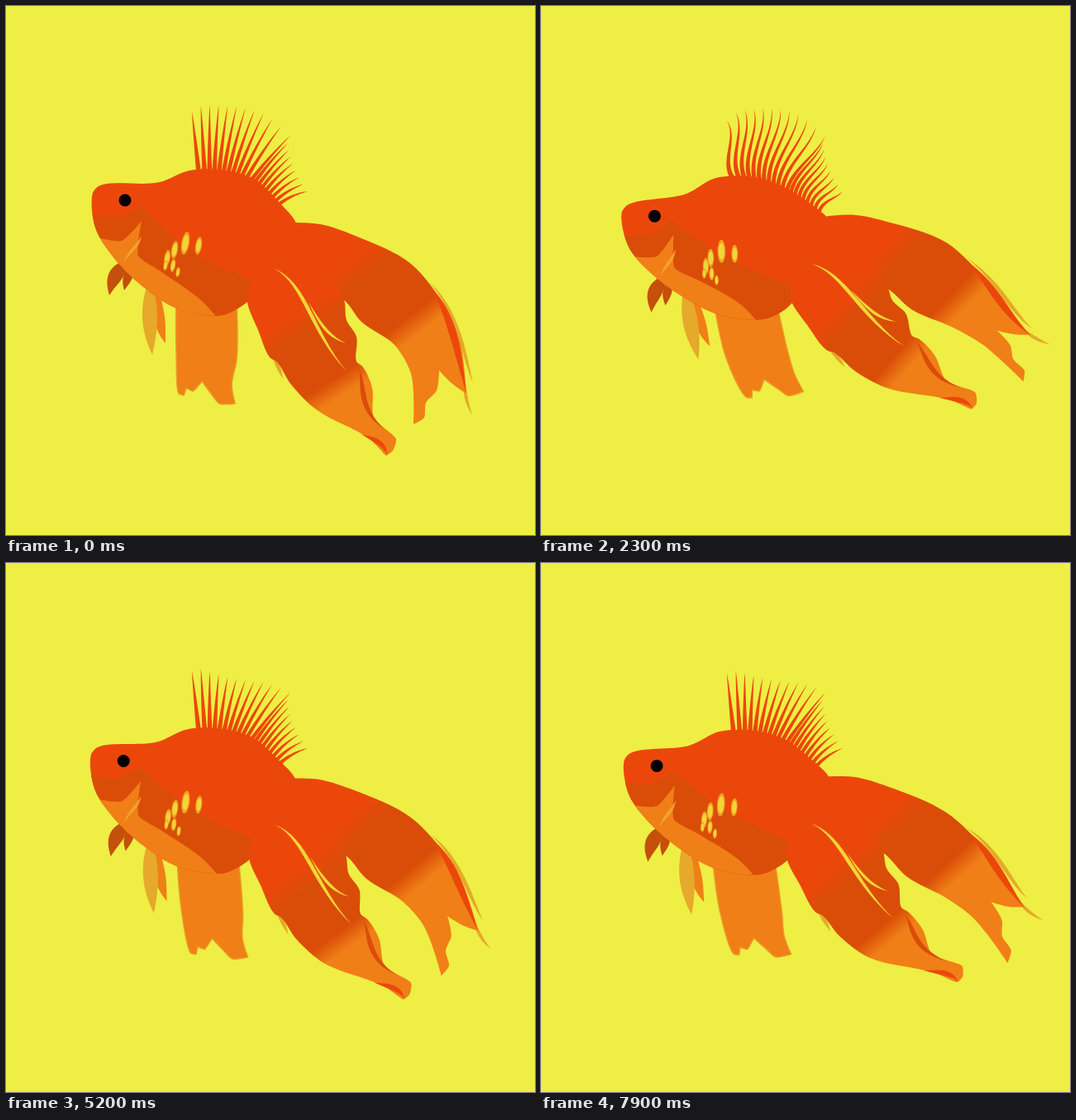
Recreate the animation shown at these times as an HTML page with a canvas. Size 640x640 px, loop 8 s.

```html
<!DOCTYPE html>
<html lang="en">
<head>
<meta charset="utf-8">
<title>Goldfish</title>
<style>
html, body { margin: 0; width: 100%; height: 100%; overflow: hidden; background: #eeee44; }
canvas { display: block; width: 100vw; height: 100vh; }
</style>
</head>
<body>
<canvas id="stage" width="640" height="640"></canvas>
<script>
const ctx = document.getElementById('stage').getContext('2d');
const LOOP = 8000, STEP = 100, PERIOD = 6250;
const RED = '#ec470b', DARK = '#da4d08', ORANGE = '#f07f17',
  RUST = '#c4500b', AMBER = '#e6a92a', YELLOW = '#f2d636';

const clamp = v => Math.max(0, Math.min(1, v));
const ease = v => v * v * (3 - 2 * v);

// swing: raw stroke, lift: eased stroke, flare: tail tips opening,
// wave: ripple in the dorsal rays, trim: shortening of those rays
let swing, lift, flare, wave, trim;

function setPose(t) {
  const phase = (t - 100) / PERIOD * 2 * Math.PI;
  swing = (1 - Math.cos(phase)) / 2;
  lift = ease(swing);
  flare = (1 - lift) * clamp(t / 2500) * (1 + Math.cos(phase - .8)) / 2;
  wave = Math.max(0, Math.sin(Math.PI * t / 4800));
  trim = ease(clamp((t - 2300) / 1200));
}

// turns every point about a hinge by an angle that depends on where it lies
function swivel(p, cx, cy, angle, stretch = () => 0) {
  const out = [];
  for (let i = 0; i < p.length; i += 2) {
    const x = p[i], y = p[i + 1], r = Math.hypot(x - cx, y - cy);
    const a = Math.atan2(y - cy, x - cx) - angle(x, y, r), len = r + stretch(x, y, r);
    out.push(cx + len * Math.cos(a), cy + len * Math.sin(a));
  }
  return out;
}

const HINGE = [288, 295], TURN = .145;
const below = (y, level) => Math.max(0, y - level);
const curl = r => flare * Math.max(-.05, .0015 * (r - 240)) * clamp(r / 150);

const rigid = p => swivel(p, ...HINGE, () => lift * TURN);
const torso = p => swivel(p, ...HINGE, (x, y) => lift * (TURN - .0006 * below(y, 280)))
  .map((v, i) => i % 2 ? v + lift * 9 * Math.exp(-(((p[i - 1] - 300) / 40) ** 2)) : v);
const lower = p => swivel(p, ...HINGE,
  (x, y, r) => lift * (TURN + .0006 * below(y, 280)) + curl(r));
const upper = p => swivel(p, ...HINGE,
  (x, y, r) => lift * (TURN + .0018 * below(y, 400)) + curl(r),
  (x, y, r) => clamp(lift + flare) * .6 * clamp((r - 130) / 80)
    * Math.max(0, .66 * (y - 300) - .75 * (x - 409)));
const belly = p => swivel(p, 245, 330, (x, y) => swing * .35 * clamp((y - 330) / 130));
const vent = p => swivel(p, 185, 330, () => swing * swing * .23)
  .map((v, i) => i % 2 ? v + lift * 6 : v);

// smooth closed outline that keeps sharp corners
function outline(p) {
  const n = p.length / 2, at = i => [p[(i + n) % n * 2], p[(i + n) % n * 2 + 1]];
  const tangent = i => {
    const [x0, y0] = at(i - 1), [x, y] = at(i), [x1, y1] = at(i + 1);
    const ax = x - x0, ay = y - y0, bx = x1 - x, by = y1 - y;
    const la = Math.hypot(ax, ay) || 1, lb = Math.hypot(bx, by) || 1;
    const k = Math.max(0, (ax * bx + ay * by) / (la * lb)) / 3;
    const dx = ax / la + bx / lb, dy = ay / la + by / lb, m = Math.hypot(dx, dy) || 1;
    return [dx / m * k, dy / m * k];
  };
  ctx.beginPath();
  ctx.moveTo(p[0], p[1]);
  for (let i = 0; i < n; i++) {
    const [x, y] = at(i), [x1, y1] = at(i + 1), s = tangent(i), e = tangent(i + 1);
    const d = Math.hypot(x1 - x, y1 - y);
    ctx.bezierCurveTo(x + s[0] * d, y + s[1] * d, x1 - e[0] * d, y1 - e[1] * d, x1, y1);
  }
  ctx.closePath();
}

function shape(p, fill) {
  outline(p);
  ctx.fillStyle = fill;
  ctx.fill();
}

function disc(x, y, rx, ry, tilt, fill) {
  ctx.beginPath();
  ctx.ellipse(x, y, rx, ry, tilt, 0, 2 * Math.PI);
  ctx.fillStyle = fill;
  ctx.fill();
}

const spike = u => Math.pow(1 - u, .8);
const leaf = u => Math.sin(Math.PI * u);

// tapered stroke along a cubic with four control points
function ribbon(p, width, fill, profile = leaf) {
  const left = [], right = [], N = 16;
  for (let i = 0; i <= N; i++) {
    const u = i / N, v = 1 - u;
    const pos = k => v * v * v * p[k] + 3 * v * v * u * p[k + 2] + 3 * v * u * u * p[k + 4] + u * u * u * p[k + 6];
    const vel = k => v * v * (p[k + 2] - p[k]) + 2 * v * u * (p[k + 4] - p[k + 2]) + u * u * (p[k + 6] - p[k + 4]);
    const dx = vel(0), dy = vel(1), m = Math.hypot(dx, dy) || 1, w = width / 2 * profile(u);
    left.push([pos(0) - dy / m * w, pos(1) + dx / m * w]);
    right.unshift([pos(0) + dy / m * w, pos(1) - dx / m * w]);
  }
  ctx.beginPath();
  left.concat(right).forEach(([x, y]) => ctx.lineTo(x, y));
  ctx.closePath();
  ctx.fillStyle = fill;
  ctx.fill();
}

function shade(p) {
  const g = ctx.createLinearGradient(...p);
  [[0, RED], [.22, DARK], [.8, DARK], [1, ORANGE]].forEach(s => g.addColorStop(...s));
  return g;
}

// tips follow an arch first, then run down behind it
function rayTip(i) {
  const arch = 11, j = i - arch;
  if (j > 0) return [341 + 24 * (j / 8) ** 2, 157 + 8.4 * j];
  const y = 120 + 37 * (i / arch) ** 4 + 8 * Math.exp(-2 * i);
  return [225 + 10.8 * i, y + 18 * trim * Math.sin(Math.PI * i / arch) + lift * 12 * Math.exp(-i / 3)];
}

function dorsal() {
  const count = 20;
  for (let i = 0; i < count; i++) {
    const u = (i / (count - 1)) ** .88;
    const x = 233 + 97 * u + 7 * lift * u, y = 200 + 40 * u * u + 11 * lift;
    const [tx, ty] = rayTip(i), dx = tx - x, dy = ty - y, m = Math.hypot(dx, dy);
    const bow = wave * 14 * (1 - u * .6), sag = u * 3;
    const at = (k, off) => [x + dx * k + dy / m * off, y + dy * k - dx / m * off];
    ribbon([x, y, ...at(.33, bow + sag), ...at(.68, sag - bow * .8), tx, ty], 6 - u * 1.4, RED, spike);
  }
}

function bellyFins() {
  ribbon(vent([183,335, 183,365, 186,390, 193,408]), 13, ORANGE);
  ribbon(vent([176,325, 172,355, 174,395, 177,422]), 18, AMBER);
  ribbon(rigid([152,306, 135,318, 128,330, 125,350]), 17, RUST);
  ribbon(rigid([154,308, 150,322, 145,332, 143,344]), 11, RUST);
  shape(belly([206,340, 206,420, 209,469, 215,471, 218,462, 226,466, 237,454, 248,469,
    258,481, 277,481, 273,458, 279,428, 278,340]), ORANGE);
  ctx.strokeStyle = '#ea9a23';
  ctx.lineWidth = 1.5;
  ctx.stroke();
}

function upperTail() {
  ribbon(upper([512,334, 545,365, 555,425, 565,457]), 5, AMBER);
  ribbon(upper([553,440, 555,470, 557,480, 564,495]), 4, AMBER);
  shape(upper([340,262, 380,264, 420,277, 490,312, 535,371, 550,410, 557,469, 540,457, 524,441,
    521,465, 508,480, 506,498, 493,506, 490,445, 470,410, 430,382, 409,356, 340,330]),
    shade(upper([428,298, 503,394])));
  ribbon(upper([512,338, 538,370, 545,410, 557,469]), 9, RED);
}

function lowerTail() {
  ribbon(lower([321,420, 327,430, 331,440, 335,451]), 5, AMBER);
  shape(lower([292,356, 305,392, 320,426, 327,430, 345,458, 375,488, 440,524, 460,544, 468,538,
    472,524, 445,498, 443,462, 432,437, 424,430, 424,400, 412,380, 409,356, 370,300, 315,300]),
    shade(lower([341,378, 403,474])));
  ribbon(lower([427,438, 434,460, 426,488, 458,512]), 6, DARK);
  ribbon(lower([430,518, 448,526, 457,528, 461,543]), 6, RED);
  ribbon(lower([325,318, 362,335, 370,395, 412,442]), 4.5, YELLOW);
  ribbon(lower([366,358, 380,385, 390,400, 411,408]), 3.5, YELLOW);
}

function body() {
  ctx.save();
  shape(torso([105,226, 112,218, 186,213, 222,199, 265,199, 300,209, 330,237, 351,263,
    345,300, 292,358, 262,374, 207,366, 165,339, 130,304, 108,268]), RED);
  ctx.clip();
  shape(torso([95,250, 135,256, 164,243, 172,258, 150,288, 100,285]), DARK);
  shape(torso([166,245, 206,282, 250,311, 300,335, 296,364, 255,385, 160,330]), DARK);
  shape(torso([95,276, 140,284, 164,260, 160,302, 190,323, 237,357, 262,385, 170,380, 100,310]), ORANGE);
  ribbon(torso([164,278, 160,290, 150,296, 142,310]), 4, '#f3a12c');
  ctx.restore();

  const scales = [[217,287,14], [204,295,11], [233,290,11], [195,305,10], [202,314,8], [208,322,6], [193,314,6]];
  scales.forEach(([x, y, r], i) => {
    const sx = x + lift * (i > 2 ? 5 : 1.5), sy = y + lift * 11, tilt = .17 - lift * .2;
    disc(sx, sy, r * .3 + .6, r, tilt, '#f0a024');
    disc(sx, sy, r * .22 + .4, r * .72, tilt, YELLOW);
  });

  const [x, y] = rigid([144, 235]);
  disc(x, y, 7.5, 7.5, 0, '#000');
}

function draw(now) {
  setPose(Math.floor(now % LOOP / STEP) * STEP);
  ctx.fillStyle = '#eeee44';
  ctx.fillRect(0, 0, 640, 640);
  bellyFins();
  upperTail();
  dorsal();
  body();
  lowerTail();
}

const start = performance.now();
function tick() {
  draw(performance.now() - start);
  requestAnimationFrame(tick);
}
tick();
</script>
</body>
</html>
```
